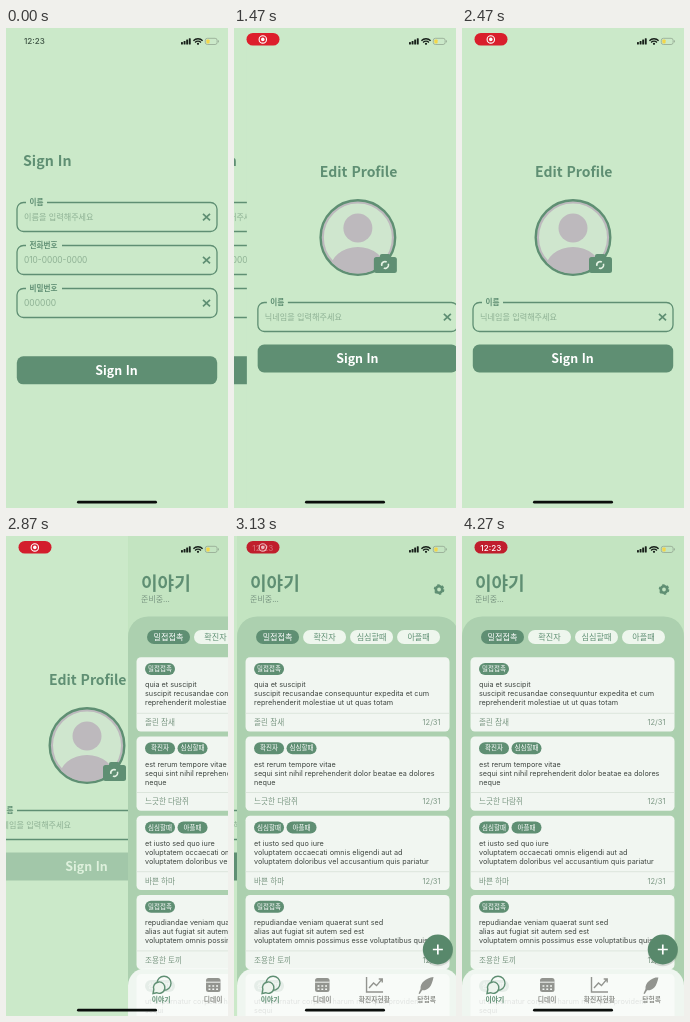
Write an HTML page that moves like this. It is 222 px wide and 480 px high and loops after 4.34 s.

```html
<!DOCTYPE html>
<html lang="ko">
<head>
<meta charset="utf-8">
<style>
  html, body { margin: 0; height: 100%; overflow: hidden; background: #cbe9c9; }
  svg { display: block; }
  text { font-family: Inter, "Noto Sans CJK KR", "Noto Sans CJK", sans-serif; }
  .kr { font-family: "Noto Sans CJK KR", "Noto Sans CJK", "Noto Sans CJK JP", sans-serif; }
</style>
</head>
<body>
<svg id="stage" width="222" height="480" viewBox="0 0 222 480"></svg>
<script>
const LOOP = 4340, WIDTH = 222;
const BG = '#cbe9c9', GREEN = '#5f8f73', HINT = '#8db093', SOFT = '#7b9783', INK = '#3f4641';

// y is the vertical middle of the line
const text = (x, y, size, fill, str, { weight = 400, anchor = 'start', cls = 'kr' } = {}) =>
  `<text class="${cls}" x="${x}" y="${y + size * .36}" font-size="${size}" fill="${fill}"
    font-weight="${weight}" text-anchor="${anchor}">${str}</text>`;
const latin = (x, y, size, fill, str, opts) => text(x, y, size, fill, str, { cls: '', ...opts });
const rect = (x, y, w, h, r, fill, extra = '') =>
  `<rect x="${x}" y="${y}" width="${w}" height="${h}" rx="${r}" fill="${fill}" ${extra}/>`;
const circle = (x, y, r, fill, extra = '') => `<circle cx="${x}" cy="${y}" r="${r}" fill="${fill}" ${extra}/>`;
const line = (d, stroke, width, extra = '') =>
  `<path d="${d}" fill="none" stroke="${stroke}" stroke-width="${width}" ${extra}/>`;
const centered = { anchor: 'middle' };

const field = (y, label, notch, hint) =>
  rect(11, y, 200, 29, 6.5, 'none', `stroke="${GREEN}" stroke-width="1.3"`) +
  rect(20, y - 2, notch, 4, 0, BG) +
  text(23.5, y, 7.6, GREEN, label, { weight: 800 }) + hint +
  line(`M197 ${y + 11.3}l7 6.6m0-6.6l-7 6.6`, GREEN, 1.7);

const button = (id, y) => `<g id="${id}">${rect(10.8, y, 200.4, 28, 6.5, GREEN)}
  ${text(110.5, y + 13.8, 12.4, '#fff', 'Sign In', { weight: 700, anchor: 'middle' })}</g>`;

const page = (id, content) => `<g id="${id}">${rect(0, 0, WIDTH, 480, 0, BG)}${content}</g>`;

const signIn = page('signIn',
  text(17, 132.5, 14.2, GREEN, 'Sign In', { weight: 700 }) +
  field(174.5, '이름', 21, text(18, 189, 8.15, HINT, '이름을 입력해주세요')) +
  field(217.5, '전화번호', 36, latin(18, 232.3, 8.3, HINT, '010-0000-0000')) +
  field(260.5, '비밀번호', 36, latin(18, 275.3, 8.5, HINT, '000000')) +
  button('loginButton', 328.3));

const profile = page('profile',
  text(73, 144, 14, GREEN, 'Edit Profile', { weight: 700 }) +
  `<clipPath id="round"><circle cx="111" cy="209.5" r="36"/></clipPath>` +
  circle(111, 209.5, 35.2, '#cfe6ce', 'stroke="#bdb9bd" stroke-width="2.4"') +
  circle(111, 209.5, 37.3, 'none', `stroke="${GREEN}" stroke-width="2.4"`) +
  circle(111, 200, 14.5, '#bdb9bd') +
  `<ellipse cx="111" cy="242" rx="28" ry="23" fill="#bdb9bd" clip-path="url(#round)"/>` +
  rect(127, 229, 23, 16, 2.5, GREEN) + rect(133, 226, 10.5, 6, 2, GREEN) +
  circle(138.2, 237, 3.4, 'none', 'stroke="#e4f2e3" stroke-width="1.6" stroke-dasharray="7.7 3" transform="rotate(-20 138.2 237)"') +
  field(274.5, '이름', 21, text(18, 289, 8.15, HINT, '닉네임을 입력해주세요')) +
  button('saveButton', 316.5));

const posts = [
  [['밀접접촉'], '졸린 참새', 'quia et suscipit', 'suscipit recusandae consequuntur expedita et cum', 'reprehenderit molestiae ut ut quas totam'],
  [['확진자', '심심할때'], '느긋한 다람쥐', 'est rerum tempore vitae', 'sequi sint nihil reprehenderit dolor beatae ea dolores', 'neque'],
  [['심심할때', '아플때'], '바쁜 하마', 'et iusto sed quo iure', 'voluptatem occaecati omnis eligendi aut ad', 'voluptatem doloribus vel accusantium quis pariatur'],
  [['밀접접촉'], '조용한 토끼', 'repudiandae veniam quaerat sunt sed', 'alias aut fugiat sit autem sed est', 'voluptatem omnis possimus esse voluptatibus quis'],
  [['심심할때'], '', 'ut aspernatur corporis harum nihil quis provident', 'sequi', '']
];

const card = ([tags, author, ...lines], i) => {
  const y = 121.3 + i * 79.2;
  return rect(8.5, y, 204, 74.3, 4.5, '#f1f6f1') +
    tags.map((tag, n) => rect(17 + n * 32.5, y + 5.8, 30, 12, 6, GREEN) +
      text(32 + n * 32.5, y + 11.6, 6.5, '#fff', tag, { weight: 500, anchor: 'middle' })).join('') +
    lines.map((str, n) => latin(17, y + 27.4 + n * 9, 7.25, INK, str)).join('') +
    line(`M8.5 ${y + 56}h204`, '#d5ded5', .7) +
    text(17, y + 65.2, 7.6, SOFT, author) +
    latin(203.5, y + 65.2, 7.5, SOFT, '12/31', { anchor: 'end' });
};

const chips = ['밀접접촉', '확진자', '심심할때', '아플때'].map((name, i) =>
  rect(19 + i * 47, 94, 43, 14, 7, i ? '#eef6ed' : GREEN) +
  text(40.5 + i * 47, 101, 8.1, i ? GREEN : '#fff', name, centered)).join('');

const GREY = '#92948f';
const tabIcons =
  circle(36, 447.3, 7, 'none', `stroke="${GREEN}" stroke-width="1.4"`) +
  `<path d="M25 457.5l.8-4a5.7 5.7 0 1 1 2.8 3.2z" fill="#edf4ed" stroke="${GREEN}" stroke-width="1.4"/>` +
  rect(78, 442, 14.5, 14, 2.5, GREY) +
  line('M78 446.2h14.5', '#f4f7f4', 1) +
  line('M80.5 450h9.5M80.5 453.2h9.5', '#f4f7f4', 1.6, 'stroke-dasharray="1.9"') +
  line('M129.5 441v15h16.5', GREY, 1.4) + line('M132 452l4.5-5 3 2.6 5.5-6.6m-3.3 0h3.5v3.5', GREY, 1.4) +
  `<path d="M196.5 441c-8 1-13.5 6-13 12l-2 4.5 1.2.4 2.4-3.6c6 .3 9.6-3.4 11.4-13.3z" fill="${GREY}"/>`;
const tabLabels = ['이야기', '디데이', '확진자현황', '탐험록'].map((name, i) =>
  text(33 + i * 52.2, 464, 6.8, i ? GREY : GREEN, name, { weight: 700, anchor: 'middle' })).join('');

const gear = circle(202, 53.5, 3.2, 'none', `stroke="${GREEN}" stroke-width="2.6"`) +
  circle(202, 53.5, 4.6, 'none', `stroke="${GREEN}" stroke-width="1.4" stroke-dasharray="2.41"`);

const stories = page('stories',
  rect(0, 0, WIDTH, 120, 0, '#c3e4c1') +
  text(13, 47.3, 18, GREEN, '이야기', { weight: 900 }) +
  text(13, 63, 8, SOFT, '준비중...') + gear +
  rect(0, 80.5, WIDTH, 420, 20, '#acd0af') + chips + posts.map(card).join('') +
  circle(200.8, 415, 15.2, '#000', 'opacity=".12"') + circle(200.8, 413.5, 15, '#58886b') +
  line('M195.8 413.5h10m-5-5v10', '#fff', 1.7) +
  rect(0, 432.5, WIDTH, 70, 17, '#fafcfa', 'opacity=".87"') + tabIcons + tabLabels);

const DARK = '#3c5142';
const clock = fill => latin(28.4, 13, 8.1, fill, '12:23', { weight: 500, anchor: 'middle' });
const statusBar =
  `<g id="plainTime">${clock(DARK)}</g>
  <g id="pill">${rect(12.5, 5, 33, 12.6, 6.3, '#c92030', 'id="pillShape"')}
    <g id="record">${circle(28.8, 11.4, 3.7, 'none', 'stroke="#fff" stroke-width="1.1"')}${circle(28.8, 11.4, 1.8, '#fff')}</g>
    <g id="pillTime" transform="translate(.4 -1.4)">${clock('#fff')}</g>
  </g>` +
  [2.4, 3.6, 4.9, 6.2].map((h, i) => rect(175 + i * 2.6, 16.5 - h, 1.9, h, .5, '#18201a')).join('') +
  line('M187.4 12.7a6.4 6.4 0 0 1 9.2 0M189.1 14.4a4 4 0 0 1 5.8 0', '#18201a', 1.4) +
  circle(192, 15.8, 1.1, '#18201a') +
  rect(199.3, 10.3, 11.8, 6.2, 2, 'none', 'stroke="#93a892" stroke-width=".8"') +
  rect(200.4, 11.4, 3.2, 4, .9, '#f3d64a') + rect(211.9, 12.2, .9, 2.3, .4, '#93a892') +
  rect(71, 472.8, 80, 2.8, 1.4, '#0b0f0c');

document.getElementById('stage').innerHTML = signIn + profile + stories + statusBar;
const el = id => document.getElementById(id);

const ramp = (t, start, duration) => Math.min(1, Math.max(0, (t - start) / duration));
const easeInOut = p => p < .5 ? 2 * p * p : 1 - 2 * (1 - p) ** 2;

// Critically damped spring, from 1 (offscreen) to 0 (in place)
const springLeft = (t, start) => {
  const u = Math.max(0, t - start) / 1000 * Math.sqrt(1000 / 3);
  return (1 + u) * Math.exp(-u);
};
const pressOpacity = (t, down, up) => t < down ? 1 : .2 + .8 * easeInOut(ramp(t, up, 250));

const place = (id, x, visible) => {
  el(id).setAttribute('transform', `translate(${x.toFixed(2)} 0)`);
  el(id).setAttribute('display', visible ? 'inline' : 'none');
};
const fade = (id, value) => el(id).setAttribute('opacity', value);

function draw(t) {
  const first = springLeft(t, 1221), second = springLeft(t, 2787.5);
  place('signIn', -.3 * WIDTH * (1 - first), first > .001);
  place('profile', WIDTH * first - .3 * WIDTH * (1 - second), first < 1 && second > .001);
  place('stories', WIDTH * second, second < 1);
  fade('loginButton', pressOpacity(t, 1050, 1220));
  fade('saveButton', pressOpacity(t, 2570, 2790));

  const shown = ramp(t, 40, 400), toTime = ramp(t, 3050, 250);
  const glow = .5 - .5 * Math.cos(2 * Math.PI * (t - 1035) / 1068);
  el('pillShape').setAttribute('fill', `rgb(${192 + 32 * glow},30,44)`);
  fade('plainTime', 1 - shown);
  fade('pill', shown);
  fade('record', 1 - toTime);
  fade('pillTime', toTime);
}

const begin = performance.now();
function tick() {
  draw((performance.now() - begin) % LOOP);
  requestAnimationFrame(tick);
}
tick();
</script>
</body>
</html>
```
